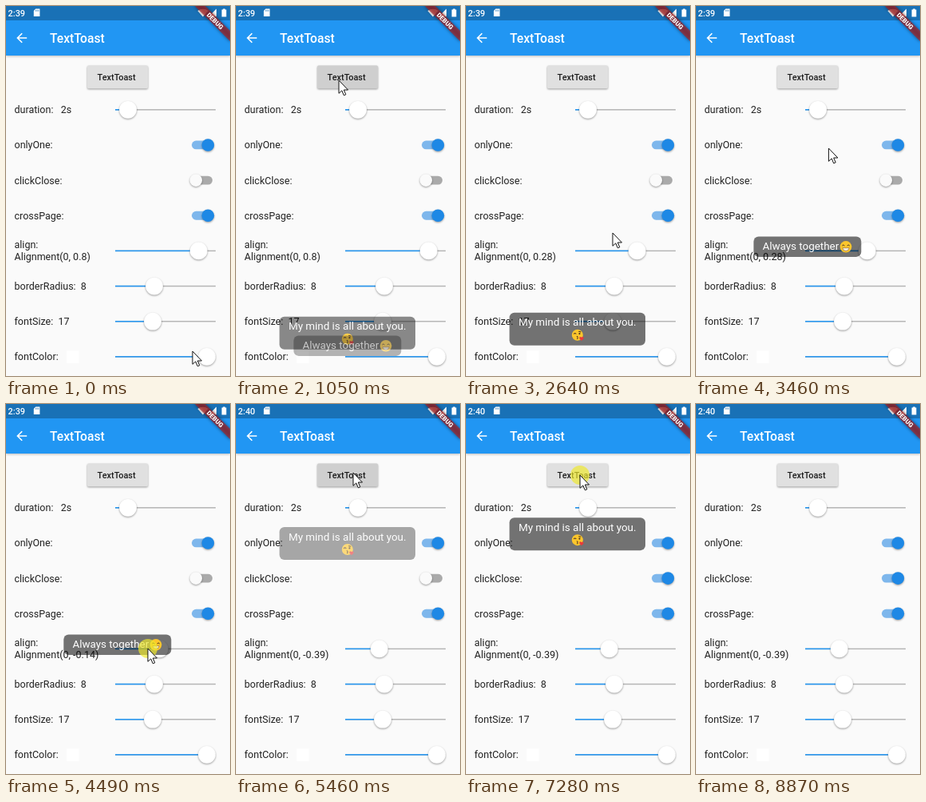
These frames come from a looping animation (281x463 px, 9380 ms). An HTML page:

```html
<!DOCTYPE html>
<html lang="en">
<head>
<meta charset="utf-8">
<title>Toast settings</title>
<style>
  html, body { margin: 0; width: 100%; height: 100%; overflow: hidden; background: #fafafa; }
  svg { display: block; }
  text { font-family: Roboto, "Noto Sans", sans-serif; font-size: 12.5px; fill: rgba(0,0,0,.87); white-space: pre; }
  .white { fill: #fff; }
  .lift { filter: drop-shadow(0 1px 1.2px rgba(0,0,0,.38)); }
  .bar { filter: drop-shadow(0 1px 1.5px rgba(0,0,0,.25)); }
</style>
</head>
<body>
<svg width="281" height="463" viewBox="0 0 281 463">
  <defs>
    <g id="kiss">
      <circle r="7" fill="#fcc62c"/>
      <path d="M-4.6-1.2q1.5-2 3 0M1.4-4.4l3 .6" fill="none" stroke="#4c3423" stroke-width="1.1"/>
      <circle cx="2.6" cy="-1.6" r="1.1" fill="#4c3423"/>
      <path d="M-1 1.6q2.4.2 .8 1.6q2 .9-.6 1.8" fill="none" stroke="#4c3423"/>
      <path d="M5 7.2L2.4 4.2q-.4-2 1.4-2q1 .1 1.3.9q.8-1 2-.6q1.3.7.4 2.2z" fill="#e93b3b"/>
    </g>
    <g id="grin">
      <circle r="7.3" fill="#fcc62c"/>
      <path d="M-4.8-1.2q1.6-2.4 3.2 0M1.6-1.2q1.6-2.4 3.2 0" fill="none" stroke="#4c3423"/>
      <path d="M-4.2 1.4h8.4q-.6 3.8-4.2 3.8T-4.2 1.4z" fill="#f4f1e4" stroke="#8a5a2c" stroke-width=".6"/>
    </g>
  </defs>

  <rect width="281" height="463" fill="#fafafa"/>
  <g class="lift">
    <rect x="102" y="74.6" width="76" height="28.6" rx="1.6" fill="#e0e0e0"/>
    <rect id="shade" x="102" y="74.6" width="76" height="28.6" rx="1.6"/>
  </g>
  <text x="114.6" y="92.8" style="font-size:10.9px;font-weight:500">TextToast</text>
  <g id="rows"></g>
  <rect x="76" y="431.3" width="15.6" height="15.6" fill="#fff"/>

  <rect class="bar" width="281" height="62" fill="#2196f3"/>
  <rect width="281" height="18" fill="#1971b6"/>
  <path d="M26.2 40H14.6M20.2 34.2L14.4 40l5.8 5.8" fill="none" stroke="#fff" stroke-width="1.6"/>
  <text class="white" x="55" y="46" style="font-size:15.6px;font-weight:500">TextToast</text>

  <g id="toasts"></g>

  <text id="clock" class="white" x="2.6" y="12.9" style="font-size:10.9px;font-weight:500"></text>
  <g fill="#fff">
    <path d="M37.2 3.6H42.4V13H34.8V6z"/>
    <path d="M247 13.4L240.4 6Q247 1.4 253.6 6z"/>
    <path d="M254.4 13.2H264V3.6z"/>
    <path d="M270.6 4.6h1.6V3.4h2.6v1.2h1.6v8.8h-5.8z"/>
  </g>
  <path d="M37.4 4.8v2M39.1 4.8v2M40.8 4.8v2" stroke="#1971b6" stroke-width=".7"/>

  <g transform="translate(281 0) rotate(45)">
    <rect x="-31.2" y="21.9" width="62.4" height="9.3" fill-opacity=".5" style="filter:blur(2px)"/>
    <rect x="-31.2" y="21.9" width="62.4" height="9.3" fill="#b71c1c" fill-opacity=".63"/>
    <text class="white" y="29.4" text-anchor="middle" style="font-size:8px;font-weight:900">DEBUG</text>
  </g>

  <g id="mouse">
    <circle id="glow" r="12" fill="#efe92c" fill-opacity=".68"/>
    <path d="M0 0V16.3L3.8 12.9L6.3 18.8L8.8 17.8L6.3 12H11.5Z" fill="#fff" stroke="#111"/>
  </g>
</svg>
<script>
const LOOP = 9380, FADE = 256, SLIDE = 31.2, LIFE = 2000;
const SLIDER_MID = 200, SLIDER_UNIT = 52.1, FIRST_ALIGN = .8;
const $ = id => document.getElementById(id);

const clamp = v => Math.max(0, Math.min(1, v));
const lerp = (a, b, k) => a + (b - a) * k;
const smooth = k => k * k * (3 - 2 * k);
const decelerate = k => 1 - (1 - k) ** 2;

// What the pointer does, in order
const rest = (at, x, y) => ({ down: at, up: at, x, y, endX: x });
const press = (up, x, y, more) => ({ down: up - 90, up, x, y, endX: x, ...more });
const tap = (up, x, y) => press(up, x, y, { tap: true, dismiss: true });
const drag = (down, up, x, endX) => ({ down, up, x, endX, y: 306, drag: true });

const flip = press(6570, 243, 219);
const actions = [
  rest(0, 234, 432),
  ...[450, 948, 1250].map(t => tap(t, 129, 93)),
  drag(1950, 2450, 241, 214),
  rest(2640, 184, 284),
  tap(2990, 143, 89),
  drag(4050, 4750, 200, 165),
  ...[5340, 5670, 6020].map(t => tap(t, 147, 86)),
  flip,
  tap(7320, 143, 89),
  press(7700, 118, 160, { dismiss: true }),
  tap(7990, 143, 89),
  press(8330, 62, 160, { dismiss: true }),
  rest(8640, 257, 425),
  rest(8860, 264, 466)
];
const taps = actions.filter(a => a.tap);
const drags = actions.filter(a => a.drag);
const progress = (a, t) => clamp((t - a.down) / (a.up - a.down || 1));

function pointerAt(t) {
  const i = actions.findLastIndex(a => a.down <= t);
  const now = actions[i], next = actions[i + 1];
  if (t < now.up || !next) return [lerp(now.x, now.endX, progress(now, t)), now.y];
  const pause = now.up > now.down ? 40 : 0;
  const k = smooth(clamp((t - now.up - pause) / (next.down - now.up - 2 * pause)));
  return [lerp(now.endX, next.x, k), lerp(now.y, next.y, k)];
}

const alignAt = t => drags.reduce(
  (v, d) => v + (d.endX - d.x) / SLIDER_UNIT * progress(d, t), FIRST_ALIGN);

function add(parent, name, attrs, text) {
  const el = document.createElementNS('http://www.w3.org/2000/svg', name);
  for (const key in attrs) el.setAttribute(key, attrs[key]);
  if (text) el.textContent = text;
  return parent.appendChild(el);
}

const rows = $('rows');
const label = (y, text) => add(rows, 'text', { x: 10.5, y }, text);

function slider(y, start) {
  const line = { x: 137, y: y - .75, height: 1.5 };
  add(rows, 'rect', { ...line, width: 126, fill: '#b5b5b5' });
  const fill = add(rows, 'rect', { ...line, fill: '#2196f3' });
  const thumb = add(rows, 'circle', { cy: y, r: 10.9, fill: '#fff', class: 'lift' });
  const set = x => {
    fill.setAttribute('width', x - 137);
    thumb.setAttribute('cx', x);
  };
  set(start);
  return set;
}

function toggle(y, start) {
  const track = add(rows, 'rect', { x: 233, y: y - 5.4, width: 26, height: 10.8, rx: 5.4 });
  const thumb = add(rows, 'circle', { cy: y, r: 7.8, class: 'lift' });
  const mix = (a, b, k) => `rgb(${a.map((v, i) => lerp(v, b[i], k))})`;
  const set = k => {
    track.setAttribute('fill', mix([170, 170, 170], [126, 183, 236], k));
    thumb.setAttribute('fill', mix([250, 250, 250], [30, 136, 229], k));
    thumb.setAttribute('cx', lerp(238.3, 253.4, k));
  };
  set(start);
  return set;
}

const setters = {};
[
  ['duration:   2s', slider, 153],
  ['onlyOne:', toggle, 1],
  ['clickClose:', toggle, 0],
  ['crossPage:', toggle, 1],
  ['align:', slider, 241.7],
  ['borderRadius:  8', slider, 186],
  ['fontSize:  17', slider, 184],
  ['fontColor:', slider, 252]
].forEach(([text, control, start], i) => {
  const y = 129.8 + 44.15 * i;
  label(text === 'align:' ? y - 3.1 : y + 4.5, text);
  setters[text] = control(y, start);
});
const alignText = label(318, '');

const WIDE = {
  x: 54.5, w: 170.5, h: 41, textX: 66, textY: 16.7,
  text: 'My mind is all about you.', face: '#kiss', at: '139.8 28'
};
const SHORT = {
  x: 72.3, w: 135, h: 25.4, textX: 83.5, textY: 17,
  text: 'Always together', face: '#grin', at: '188 12.8'
};

// Each tap replaces the toast on show with the other kind
const toasts = taps.map((a, i) => {
  const kind = i % 2 ? SHORT : WIDE;
  const g = add($('toasts'), 'g', {});
  add(g, 'rect', { x: kind.x, width: kind.w, height: kind.h, rx: 6.2, 'fill-opacity': .54 });
  add(g, 'text', { x: kind.textX, y: kind.textY, class: 'white', style: 'font-size:13.4px' }, kind.text);
  add(g, 'use', { href: kind.face, transform: `translate(${kind.at})` });
  const from = a.up + 23;
  const closer = actions.find(b => b.dismiss && b.up > a.up);
  const to = Math.min(from + LIFE, closer ? closer.up : LOOP);
  const y = 18.3 + (447 - kind.h) / 2 * (1 + alignAt(a.up));
  return { g, from, to, y };
});

function draw(t) {
  for (const { g, from, to, y } of toasts) {
    const k = decelerate(clamp(Math.min((t - from) / FADE, 1 - (t - to) / FADE)));
    g.style.display = k > 0 ? '' : 'none';
    g.setAttribute('opacity', k);
    g.setAttribute('transform', `translate(0 ${y + SLIDE * (1 - k)})`);
  }

  const align = alignAt(t);
  alignText.textContent = `Alignment(0, ${+align.toFixed(2) || 0})`;
  setters['align:'](SLIDER_MID + SLIDER_UNIT * align);
  setters['clickClose:'](smooth(clamp((t - flip.up) / 200)));
  $('clock').textContent = t < 5200 ? '2:39' : '2:40';

  const shade = Math.max(...taps.map(({ up }) => clamp(Math.min((t - up + 20) / 80, (up + 330 - t) / 150))));
  $('shade').setAttribute('fill-opacity', .075 * shade);

  $('mouse').setAttribute('transform', `translate(${pointerAt(t)})`);
  $('glow').style.display = actions.some(a => t >= a.down && t < a.up) ? '' : 'none';
}

const begin = performance.now();
function tick() {
  draw((performance.now() - begin) % LOOP);
  requestAnimationFrame(tick);
}
tick();
</script>
</body>
</html>
```
